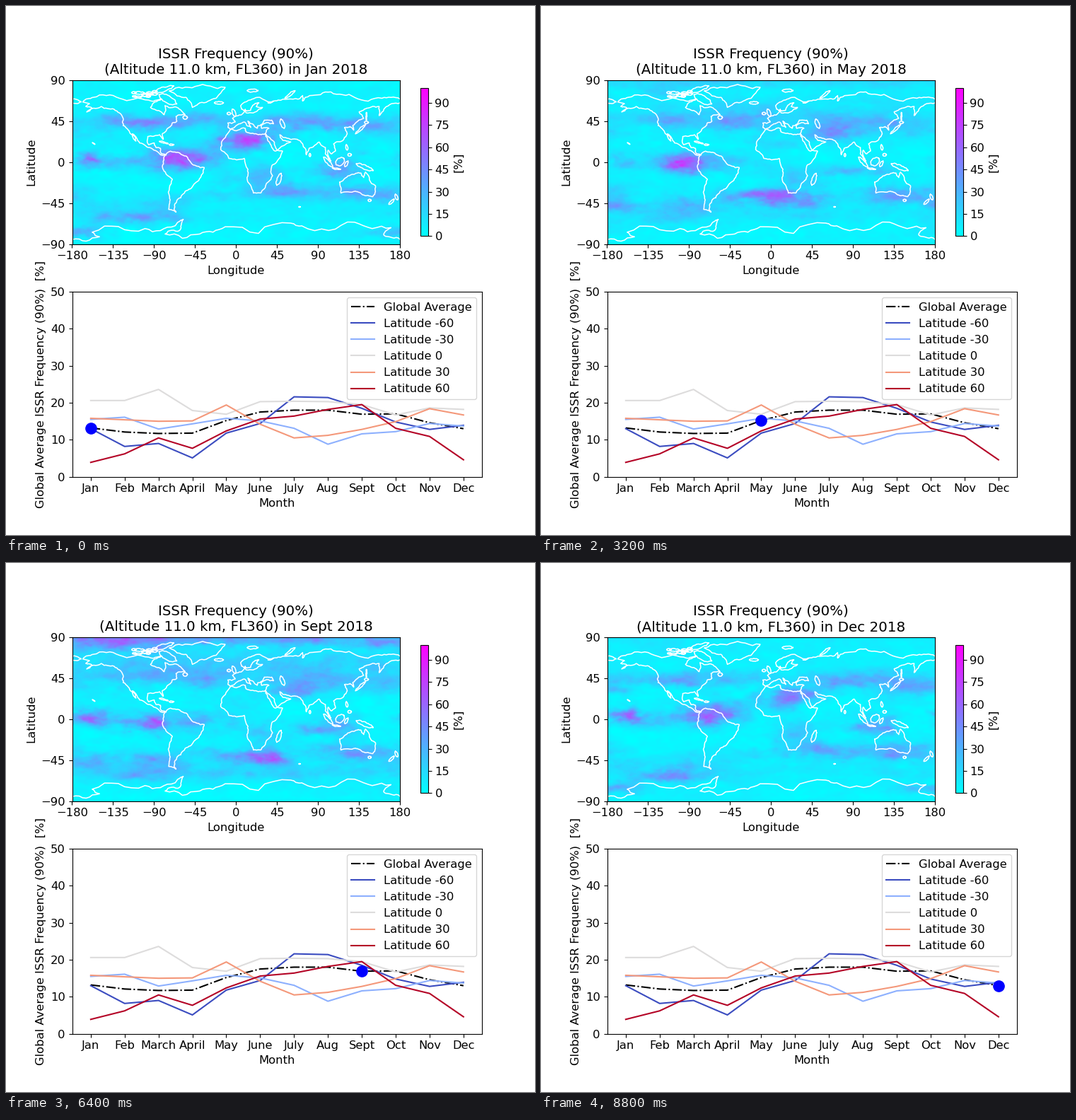
Write a matplotlib script that moves like this. It is 748x748 px and loops after 9600 ms.

```python
import numpy as np
import matplotlib.pyplot as plt
from matplotlib.animation import FuncAnimation

plt.rcParams.update({"font.family": "DejaVu Sans", "font.size": 11.75,
                     "axes.titlesize": 14.3})

MONTHS = ["Jan", "Feb", "March", "April", "May", "June",
          "July", "Aug", "Sept", "Oct", "Nov", "Dec"]
GLOBAL = [13.2, 12.1, 11.7, 11.8, 15.2, 17.5, 18.0, 18.0, 16.9, 17.0, 14.6, 13.0]
BY_LATITUDE = {
    -60: [13.0, 8.2, 9.0, 5.1, 11.8, 14.4, 21.6, 21.4, 18.5, 14.8, 12.8, 13.9],
    -30: [15.5, 16.1, 12.9, 14.3, 15.8, 15.1, 13.1, 8.8, 11.6, 12.2, 14.4, 13.7],
    0: [20.6, 20.6, 23.6, 17.9, 16.9, 20.3, 20.4, 20.3, 19.5, 16.7, 18.6, 18.2],
    30: [15.8, 15.4, 15.0, 15.1, 19.4, 14.2, 10.5, 11.2, 12.8, 14.9, 18.4, 16.7],
    60: [3.9, 6.2, 10.5, 7.7, 12.4, 15.6, 16.4, 18.2, 19.5, 13.1, 10.9, 4.6],
}

lon, lat = np.meshgrid(np.arange(-179.5, 180), np.arange(-89.5, 90))
KX = np.fft.fftfreq(360, 1 / 360)[None, :]
KY = np.fft.fftfreq(180, 1 / 360)[:, None]
SPECTRUM = (36 + KX**2 + (0.5 * KY)**2) ** -0.9


def noise(rng):
    """Cloud-like texture, stretched along the parallels."""
    n = np.fft.ifft2(np.fft.fft2(rng.standard_normal(lon.shape)) * SPECTRUM).real
    return (n - n.mean()) / n.std()


def humidity(month):
    rng = np.random.default_rng(40 + month)
    x, y = lon + 5 * noise(rng), lat + 1.6 * noise(rng)
    summer = -np.cos(2 * np.pi * month / 12)
    field = np.full(lon.shape, 4.0)

    def region(cx, cy, width, height, low, high, peak):
        """Add a humid area whose strength follows the year."""
        season = (0.5 + 0.5 * np.cos(2 * np.pi * (month - peak) / 12)) ** 2
        dx = (x - cx + 180) % 360 - 180
        field[:] += ((low + (high - low) * season)
                     * np.exp(-(dx / width)**2 - ((y - cy) / height)**2))

    # Tropics
    region(-86 - 18 * summer, -1 - 3 * summer, 25, 9, 46, 60, 5)
    region(-162, 3, 16, 8, 18, 44, 10)
    region(-125, 0, 50, 7, 12, 26, 2)
    region(-45, 2 - 6 * summer, 30, 10, 24, 30, 6)
    region(85, -9, 22, 6, 8, 44, 6)
    region(25, -16, 28, 11, 12, 24, 2)
    region(115, -8, 18, 11, 18, 32, 0)
    # Northern jet streams
    region(5, 20, 28, 9, 4, 34, 1)
    region(50 + 30 * summer, 30 + 2 * summer, 28, 9, 28, 40, 1)
    region(85, 45, 50, 8, 14, 36, 0)
    region(-110, 45, 42, 7, 15, 34, 0)
    region(-40, 46, 45, 9, 18, 26, 2)
    region(155, 38, 40, 11, 16, 24, 0)
    # Southern storm tracks
    region(135, -36, 45, 9, 26, 32, 1)
    region(35 - 22 * summer, -39 - 6 * summer, 32, 8, 34, 40, 5)
    region(-15, -37, 42, 7, 8, 36, 4)
    region(-85, -47, 36, 10, 10, 30, 6)
    region(-160, -48, 28, 7, 10, 34, 6)
    region(-110, -62, 40, 6, 6, 36, 0)
    # Polar caps
    region(180, -76, 40, 6, 0, 30, 0)
    region(0, 89, 400, 8, 0, 42, 7)
    region(-115, 83, 45, 8, 0, 42, 7)
    region(0, 60, 400, 16, 3, 15, 7)
    region(0, -58, 400, 9, 4, 12, 7)

    field *= np.exp(0.17 * noise(rng))
    field += 1.5 * noise(rng)
    # Bring each parallel's mean towards its value in the chart
    ratio = [values[month] / field[88 + at:92 + at].mean()
             for at, values in BY_LATITUDE.items()]
    gain = np.interp(lat, [-80, *BY_LATITUDE, 80], [1, *np.clip(ratio, 0.7, 1.2), 1])
    return np.clip(field * gain, 0, 95)


# Key points of the shorelines: longitude, latitude
ATLANTIC_AMERICA = [
    -168, 66, -157, 71, -128, 70, -96, 68, -82, 69, -94, 60, -82, 55, -79, 52, -78, 62,
    -70, 60, -65, 60, -56, 52, -66, 50, -65, 45, -70, 43, -76, 36, -81, 31, -80, 25,
    -84, 30, -97, 28, -96, 19, -90, 21, -88, 16, -83, 15, -82, 9, -77, 8]
PACIFIC_AMERICA = [
    -77, 8, -83, 8, -95, 16, -106, 21, -114, 31, -110, 23, -117, 33, -124, 40, -124, 48,
    -134, 58, -148, 61, -164, 55, -158, 59, -165, 61, -161, 64, -168, 66]
SOUTH_AMERICA = [
    -77, 8, -72, 12, -62, 10, -50, 0, -35, -6, -39, -17, -48, -27, -58, -35, -65, -42,
    -68, -52, -66, -55, -74, -52, -73, -38, -70, -19, -76, -14, -81, -5, -80, 1, -77, 8]
AFRICA = [
    -6, 36, 10, 37, 11, 33, 20, 31, 32, 31, 37, 21, 43, 12, 51, 12, 40, -3, 40, -15,
    35, -22, 32, -28, 27, -34, 19, -34, 12, -17, 13, -8, 9, 4, -8, 4, -17, 14, -16, 22,
    -6, 36]
NORTH_EURASIA = [
    -6, 36, -9, 38, -9, 43, -1, 44, -4, 48, 8, 54, 10, 58, 11, 54, 21, 55, 29, 60, 22, 61,
    25, 65, 18, 62, 16, 57, 12, 56, 6, 58, 5, 62, 15, 68, 26, 71, 41, 67, 35, 65, 46, 68,
    68, 69, 73, 73, 73, 67, 81, 73, 104, 77, 130, 71, 160, 70, 180, 69]
MEDITERRANEAN = [
    -6, 36, 3, 42, 9, 44, 16, 38, 13, 45, 19, 41, 23, 37, 24, 40, 29, 41, 31, 46, 39, 46,
    41, 42, 27, 41, 28, 37, 36, 37, 32, 31]
SOUTH_EURASIA = [
    180, 65, 163, 59, 157, 51, 157, 61, 143, 59, 135, 55, 140, 48, 128, 40, 129, 35,
    125, 39, 119, 38, 122, 31, 116, 23, 107, 20, 109, 12, 105, 9, 101, 13, 104, 1, 98, 9,
    98, 16, 91, 22, 80, 15, 77, 8, 73, 20, 67, 25, 57, 26, 48, 30, 51, 24, 60, 22, 45, 13,
    35, 28, 32, 31]
ANTARCTICA = [
    -180, -85, -150, -82, -158, -77, -100, -73, -67, -70, -58, -63, -62, -75, -78, -79,
    -40, -79, -12, -71, 60, -67, 72, -70, 130, -66, 170, -72, 162, -80, 180, -85]
AUSTRALIA = [
    114, -22, 126, -14, 137, -12, 140, -17, 142, -11, 153, -26, 150, -38, 139, -36,
    131, -32, 115, -34, 114, -22]
GREENLAND = [-73, 78, -55, 71, -48, 60, -40, 65, -22, 70, -12, 82, -45, 83, -73, 78]

fig, (map_ax, line_ax) = plt.subplots(2, 1, figsize=(7.48, 7.48), dpi=100)
coast_rng = np.random.default_rng(5)


def coast(points, rounds=3):
    """Draw a shoreline, roughened by midpoint displacement."""
    pts = np.reshape(points, (-1, 2))
    for _ in range(rounds):
        step = np.diff(pts, axis=0)
        shift = coast_rng.uniform(-0.14, 0.14, (len(step), 1))
        mid = pts[:-1] + step / 2 + shift * step[:, ::-1] * [-1, 1]
        pts = np.vstack([np.stack([pts[:-1], mid], 1).reshape(-1, 2), pts[-1:]])
    map_ax.plot(*pts.T, color="white", lw=1.1)


def island(cx, cy, length, width, tilt=0):
    """Draw a rough ellipse with the given half axes, tilted by degrees."""
    angle = np.linspace(0, 2 * np.pi, 9)
    along, across = length * np.cos(angle), width * np.sin(angle)
    c, s = np.cos(np.radians(tilt)), np.sin(np.radians(tilt))
    coast(np.column_stack([cx + c * along - s * across, cy + s * along + c * across]), 2)


fields = [humidity(m) for m in range(12)]
image = map_ax.imshow(fields[0], cmap="cool", vmin=0, vmax=100, origin="lower",
                      extent=(-180, 180, -90, 90), interpolation="bilinear")
for shore in (ATLANTIC_AMERICA, PACIFIC_AMERICA, SOUTH_AMERICA, AFRICA, NORTH_EURASIA,
              MEDITERRANEAN, SOUTH_EURASIA, ANTARCTICA, AUSTRALIA, GREENLAND):
    coast(shore)
coast([-180, 69, -170, 66, -180, 65])

island(-75, 69, 11, 4, -28)     # Baffin
island(-79, 80, 11, 2.5, 18)    # Ellesmere
for _ in range(11):             # Canadian Arctic
    island(coast_rng.uniform(-122, -88), coast_rng.uniform(71, 78),
           coast_rng.uniform(2, 6), coast_rng.uniform(0.8, 1.8))
island(-56, 49, 2.5, 2)         # Newfoundland
island(-79.5, 21.5, 5, 0.7, -15)  # Cuba
island(-71, 19, 2.5, 0.8)       # Hispaniola
island(-156.5, 20.5, 1.6, 0.3, -35)  # Hawaii
island(-19, 65, 5, 1.5)         # Iceland
island(-2.5, 54, 4.3, 1.8, 110)  # Britain
island(-8, 53.3, 2, 1.5)        # Ireland
island(18, 78.5, 6, 1.5)        # Svalbard
island(59, 74, 7, 1.2, 38)      # Novaya Zemlya
island(51, 42, 5.5, 2, 110)     # Caspian Sea
island(47, -19, 7, 2.3, 70)     # Madagascar
island(81, 7.6, 1.7, 1, 90)     # Sri Lanka
island(101, 0, 7.5, 1.6, -48)   # Sumatra
island(110, -7.3, 4.5, 0.7, -8)  # Java
island(114, 0.5, 5.5, 4, 40)    # Borneo
island(121, -2, 3.5, 1.4, 60)   # Sulawesi
island(141, -5.5, 10, 2.5, -22)  # New Guinea
island(121.5, 16, 3, 1.2, 100)  # Luzon
island(124.5, 8, 2, 1.6)        # Mindanao
island(136.5, 36, 7.5, 1.2, 42)  # Honshu
island(143, 43.5, 2.2, 1.4)     # Hokkaido
island(143, 50, 4.3, 0.6, 90)   # Sakhalin
island(146.5, -42, 1.7, 1.3)    # Tasmania
island(176, -38.5, 3.3, 1.4, 110)  # North Island
island(170.5, -43.7, 4, 1.2, 45)  # South Island
island(69.5, -49.2, 0.8, 0.4)   # Kerguelen

map_ax.set(xlim=(-180, 180), ylim=(-90, 90), xlabel="Longitude", ylabel="Latitude",
           xticks=range(-180, 181, 45), yticks=range(-90, 91, 45))
fig.colorbar(image, ax=map_ax, shrink=0.8, label="[%]", ticks=range(0, 91, 15))
title = map_ax.set_title("")

line_ax.plot(MONTHS, GLOBAL, "k-.", label="Global Average")
for color, (at, values) in zip(plt.cm.coolwarm(np.linspace(0, 1, 5)), BY_LATITUDE.items()):
    line_ax.plot(MONTHS, values, color=color, label=f"Latitude {at}")
marker, = line_ax.plot([0], GLOBAL[:1], "bo", ms=11, zorder=3)
line_ax.set(ylim=(0, 50), xlabel="Month",
            ylabel="Global Average ISSR Frequency (90%)  [%]")
line_ax.legend(loc="upper right")


def update(month):
    image.set_data(fields[month])
    title.set_text("ISSR Frequency (90%)\n"
                   f"(Altitude 11.0 km, FL360) in {MONTHS[month]} 2018")
    marker.set_data([month], [GLOBAL[month]])
    return image, title, marker


anim = FuncAnimation(fig, update, frames=12, interval=800, repeat=True)
plt.show()
```
